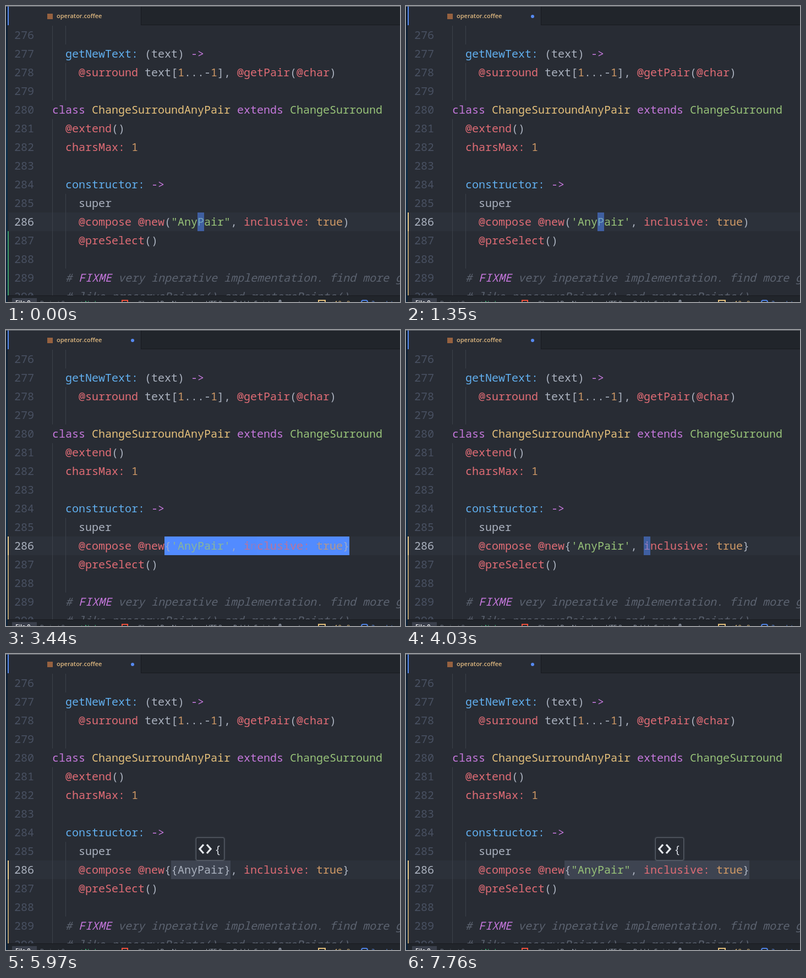
An HTML page that plays this animation: 716 by 539 pixels, repeating every 8000 ms.

```html
<!DOCTYPE html>
<html lang="en">
<head>
<meta charset="utf-8">
<title>Change surround</title>
<style>
html, body { margin: 0; width: 100%; height: 100%; overflow: hidden; background: #282c34; }
#stage { position: relative; width: 716px; height: 539px; overflow: hidden; background: #282c34; color: #abb2bf; }
#stage div, #stage svg { position: absolute; }
.row, .num, #key { font: 20px/34px "Noto Sans Mono", "DejaVu Sans Mono", monospace; font-variant-ligatures: none; white-space: pre; }
.row { left: 84px; height: 34px; }
.num { left: 15px; color: #495162; }
.num.on { color: #abb2bf; }
.guide { width: 1px; height: 34px; background: #3c414a; }
.b { color: #61afef; } .p { color: #c678dd; } .r { color: #e06c75; } .y { color: #e5c07b; }
.g { color: #98c379; } .o { color: #d19a66; } .c { color: #5c6370; }
.c, .f { font-style: italic; } .f { color: #c678dd; }

#desk { left: 0; top: 0; width: 3px; height: 539px; background: linear-gradient(#0e1c2e, #0b2f4c 45%, #0c2238); }
#tabs { left: 3px; top: 0; width: 713px; height: 34px; background: #21252b; border-bottom: 1px solid #181a1f; }
#tab { left: 0; top: 0; width: 242px; height: 35px; background: #282c34; border-right: 1px solid #181a1f; }
#accent { left: 0; top: 1px; width: 2px; height: 34px; background: #568af2; }
#edge { left: 0; top: 0; width: 716px; height: 1px; background: #74777d; }
#icon { left: 75px; top: 14px; width: 10px; height: 10px; background: #96613f; }
#name { left: 92px; top: 10px; font: 600 11px/16px "Open Sans", "Noto Sans", sans-serif; color: #e0b980; white-space: pre; }
#dot { left: 227px; top: 16px; width: 6px; height: 6px; border-radius: 50%; background: #568af2; }

#line { left: 5px; top: 376px; width: 711px; height: 34px; background: #2c313a; }
#diff { left: 3px; top: 410px; width: 2px; height: 117px; background: #3f9d69; }
#now { left: 3px; top: 376px; width: 2px; height: 34px; background: #ecc987; }
.dirty #diff { background: #b59b6b; }
#stage:not(.dirty) #now, #stage:not(.dirty) #dot { display: none; }

#mark, #tint, #cursor { top: 376px; height: 34px; }
#mark { background: #3e4451; }
.flash #mark { background: #528bff; }
#tint { background: #528bff; opacity: .22; }
#cursor { width: 12px; background: #528bff; opacity: .52; }
#stage:not(.ask):not(.flash) #mark, #stage:not(.flash) #tint, .ask #cursor, #stage:not(.ask) #hover { display: none; }

#hover { top: 334px; width: 50px; height: 40px; border: 1px solid #596069; border-radius: 3px; background: #272b33; box-shadow: 0 0 3px #626872; }
#hover svg { left: -1px; top: -1px; }
#key { left: 33px; top: 4px; color: #d5d9e0; }

#bar { left: 3px; top: 527px; width: 713px; height: 12px; overflow: hidden; background: #21252b; border-top: 1px solid #181a1f; }
#bar div { top: 5px; font: 11px/16px "Open Sans", "Noto Sans", sans-serif; color: #9da5b4; white-space: pre; }
#bar #file { left: 8px; top: 4px; width: 45px; height: 16px; text-indent: 6px; background: #3a3f4b; color: #fff; font-weight: 600; }
#bar .box { top: 7px; width: 8px; height: 9px; border: 2px solid; }
</style>
</head>
<body>
<div id="stage">
  <div id="line"></div>
  <div id="desk"></div>
  <div id="diff"></div>
  <div id="now"></div>
  <div id="mark"></div>
  <div id="code"></div>
  <div id="tint"></div>
  <div id="cursor"></div>
  <div id="hover">
    <svg width="52" height="42" fill="none" stroke="#e6e9ee" stroke-width="3.4">
      <path d="M14 13L7 21l7 8M20 13l7 8-7 8"/>
    </svg>
    <div id="key"></div>
  </div>
  <div id="tabs"><div id="tab"></div><div id="accent"></div></div>
  <div id="edge"></div>
  <div id="icon"></div>
  <div id="name">operator.coffee</div>
  <div id="dot"></div>
  <div id="bar">
    <div id="file">File 0</div>
    <div style="left:59px;color:#6b7280">Project 0</div>
    <div style="left:128px;color:#3fc27d">✓ No Issues</div>
    <div class="box" style="left:207px;color:#f0503c"></div>
    <div style="left:233px">./lib and Pre-Normal</div>
    <div style="left:360px">UTF-8</div>
    <div style="left:410px">Pebble Script</div>
    <svg style="left:492px;top:7px" width="12" height="9" fill="none" stroke="#9da5b4" stroke-width="1.5">
      <circle cx="3" cy="2.5" r="1.7"/><path d="M3 4v5M3 7q6 0 6-3"/>
    </svg>
    <div style="left:507px">master</div>
    <div class="box" style="left:564px;width:10px;color:#e5c07b"></div>
    <div style="left:588px;color:#e5c07b">+10, -8</div>
    <div class="box" style="left:642px;width:9px;border-radius:4px;color:#4f83e6"></div>
    <div style="left:661px;color:#6494ed">2 updates</div>
  </div>
</div>
<script>
const CELL = 12, ROW = 34, LEFT = 84, FIRST = 276, LOOP = 8000;
const $ = id => document.getElementById(id);

// Each line: indent depth, guide count, then "|"-separated runs led by a colour key.
const lines = [
  [0, 2, ""],
  [1, 1, "bgetNewText: |t(text) |p->"],
  [2, 2, "r@surround |ttext[|o1|t...-|o1|t], |r@getPair|t(|r@char|t)"],
  [0, 2, ""],
  [0, 0, "pclass |yChangeSurroundAnyPair |pextends |gChangeSurround"],
  [1, 1, "r@extend|t()"],
  [1, 1, "rcharsMax: |o1"],
  [0, 1, ""],
  [1, 1, "bconstructor: |p->"],
  [2, 2, "tsuper"],
  [2, 2, ""],
  [2, 2, "r@preSelect|t()"],
  [0, 2, ""],
  [1, 1, "c# |fFIXME|c very inperative implementation. find more good way."],
  [1, 1, "c# like preservePoints() and restorePoints()"]
];

function add(cls, top, left) {
  const el = document.createElement("div");
  el.className = cls;
  el.style.top = top + "px";
  if (left !== undefined) el.style.left = left + "px";
  return $("code").appendChild(el);
}

function paint(el, runs) {
  el.replaceChildren(...runs.split("|").filter(Boolean).map(run => {
    const span = document.createElement("span");
    span.className = run[0];
    span.textContent = run.slice(1);
    return span;
  }));
}

let live;
lines.forEach(([depth, guides, runs], i) => {
  const top = 36 + i * ROW, n = FIRST + i;
  for (let k = 0; k < guides; k++) add("guide", top, LEFT + k * 2 * CELL);
  add(n === 286 ? "num on" : "num", top).textContent = n;
  const row = add("row", top, LEFT + depth * 2 * CELL);
  paint(row, runs);
  if (n === 286) live = row;
});

// time, outer pair, inner pair, cursor column, mode, marked pair
const steps = [
  [0, "()", '""', 22],
  [450, "()", '""', 22, "ask", "inner"],
  [1050, "()", "''", 22, "flash", "inner"],
  [1200, "()", "''", 22],
  [1800, "()", "''", 23],
  [2090, "()", "''", 25],
  [2240, "()", "''", 29],
  [2390, "()", "''", 30],
  [2840, "()", "''", 30, "ask", "outer"],
  [3440, "{}", "''", 30, "flash", "outer"],
  [3580, "{}", "''", 30],
  [4030, "{}", "''", 29],
  [4330, "{}", "''", 25],
  [4470, "{}", "''", 22],
  [4920, "{}", "{}", 22],
  [5970, "{}", "{}", 22, "ask", "inner"],
  [6570, "{}", '""', 22],
  [7010, "{}", '""', 23],
  [7310, "{}", '""', 27],
  [7460, "{}", '""', 31],
  [7760, "{}", '""', 31, "ask", "outer"]
];
const spans = { inner: [18, 9], outer: [17, 28] };
const DIRTY_AT = 1350;

function show([, outer, inner, col, mode = "", pair]) {
  const hue = inner === "{}" ? "t" : "g";
  paint(live, `r@compose @new|t${outer[0]}|${hue}${inner[0]}AnyPair${inner[1]}|t, |rinclusive: |otrue|t${outer[1]}`);
  const x = LEFT + col * CELL;
  $("cursor").style.left = x + "px";
  $("hover").style.left = x - 3 + "px";
  $("stage").className = mode;
  if (!pair) return;
  $("key").textContent = (pair === "inner" ? inner : outer)[0];
  const [from, size] = spans[pair];
  for (const id of ["mark", "tint"]) {
    $(id).style.left = LEFT + from * CELL + "px";
    $(id).style.width = size * CELL + "px";
  }
}

const start = performance.now();
let last;
function tick() {
  const t = (performance.now() - start) % LOOP;
  const step = steps.findLast(s => s[0] <= t);
  if (step !== last) show(last = step);
  $("stage").classList.toggle("dirty", t >= DIRTY_AT);
  requestAnimationFrame(tick);
}
tick();
</script>
</body>
</html>
```
